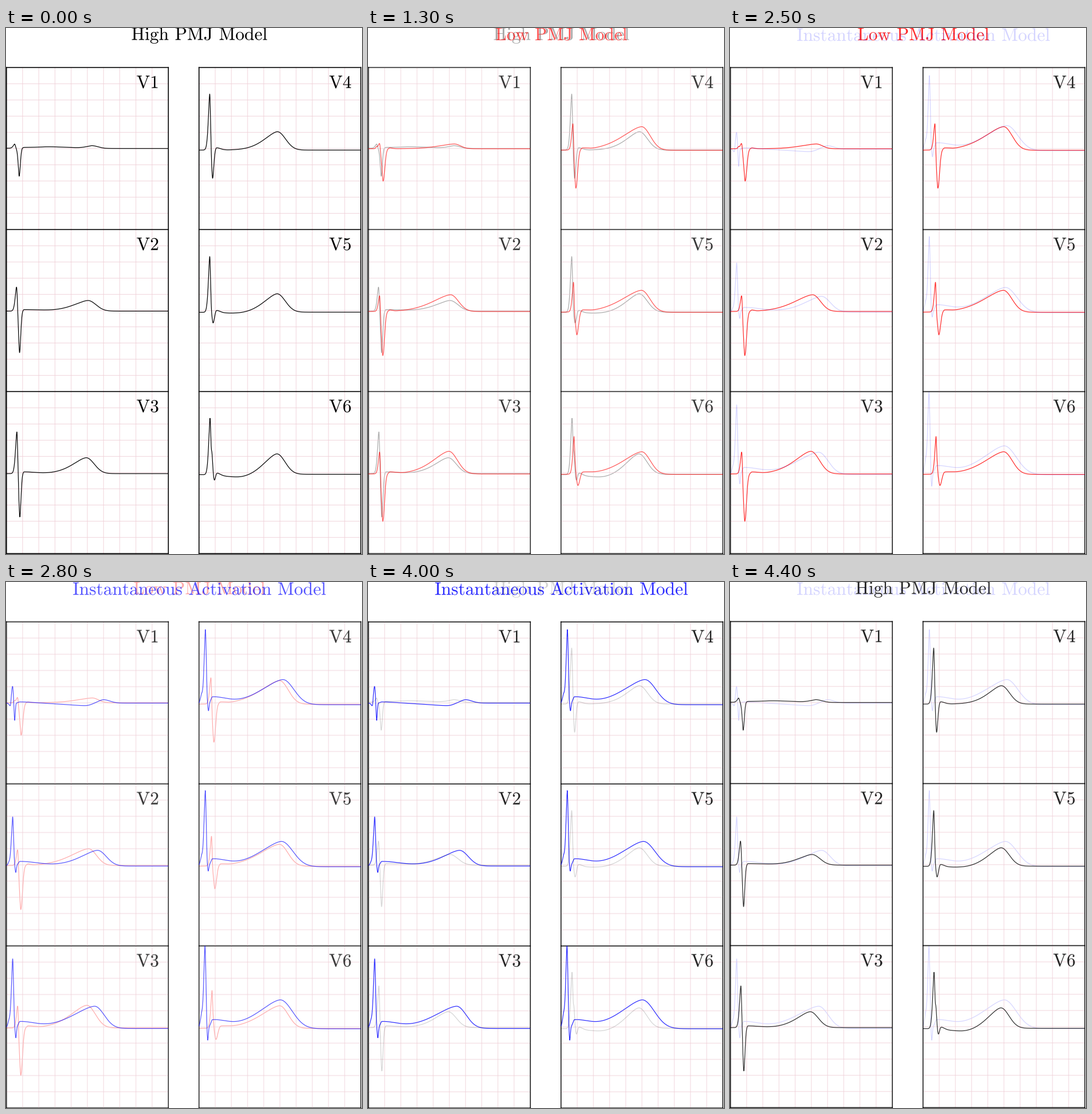
Animation of 616x909 px, one loop 4500 ms. Source, as a matplotlib script:

```python
import numpy as np
import matplotlib.pyplot as plt
from matplotlib.animation import FuncAnimation
from matplotlib.collections import LineCollection
from matplotlib.patches import PathPatch
from matplotlib.textpath import TextPath
from matplotlib.transforms import Affine2D

plt.rcParams["mathtext.fontset"] = "cm"

W, H, DPI = 616, 909, 64
PX = 72 / DPI              # one pixel in points
SIDE, CELL = 280, 28       # panel and grid size
COLS, TOP = (0.8, 334.0), 68.3
EM = 31.2                  # text size in pixels

fig = plt.figure(figsize=(W / DPI, H / DPI), dpi=DPI, facecolor="white")
ax = fig.add_axes([0, 0, 1, 1])
ax.set(xlim=(0, W), ylim=(H, 0))
ax.axis("off")


def wave(x, centre, height, rise, fall):
    """Lopsided bell: a pointed rise and a Gaussian fall."""
    u = x - centre
    return height * np.exp(-np.where(u < 0, np.abs(u / rise) ** 1.6, (u / fall) ** 2))


class Model:
    """One set of six leads whose artists fade together."""

    def __init__(self, title, color, shift, baseline, r, s, j):
        self.color, self.top, self.parts = color, TOP + shift, []
        self.r, self.s, self.j = r, s, j
        grid, frame = [], []
        y0, y1 = self.top, self.top + 3 * SIDE
        for x0 in COLS:
            x1 = x0 + SIDE
            grid += [[(x0, y0 + k * CELL), (x1, y0 + k * CELL)]
                     for k in range(30) if k % 10]
            grid += [[(x0 + k * CELL, y0), (x0 + k * CELL, y1)] for k in range(1, 10)]
            frame += [[(x0, y0 + k * SIDE), (x1, y0 + k * SIDE)] for k in range(4)]
            frame += [[(x, y0), (x, y1)] for x in (x0, x1)]
        self.lines(grid, "#f0d0d8", 0.9)
        self.lines(frame, "black", 1.6)
        for n in range(6):
            self.text(f"V{n + 1}", COLS[n // 3] + 225,
                      self.top + n % 3 * SIDE + 35.6, "black")
        self.text(title, 334.7, baseline, color, center=True)

    def lines(self, segs, color, width):
        c = LineCollection(segs, colors=color, linewidths=width * PX,
                           capstyle="projecting", snap=False)
        self.parts.append(ax.add_collection(c))

    def text(self, s, x, y, color, center=False):
        words = [r"\mathrm{%s}" % w for w in s.split()]
        path = TextPath((0, 0), "$" + r"\hspace{0.38}".join(words) + "$", size=EM)
        if center:
            box = path.get_extents()
            x -= (box.x0 + box.x1) / 2
        path = path.transformed(Affine2D().scale(1, -1).translate(x, y))
        self.parts.append(ax.add_patch(PathPatch(path, fc=color, lw=0)))

    def lead(self, n, base, r, s, j, t, *extra):
        """Add up the R, S, J and T waves of lead n above its rest level."""
        x = np.linspace(0, SIDE, 4 * SIDE + 1)
        centre, rise = self.j
        y = base + wave(x, *r, *self.r) + wave(x, *s, *self.s) + wave(x, *t)
        y += wave(x, centre, j[0], rise, j[1]) + sum(wave(x, *e) for e in extra)
        mid = self.top + (n - 1) % 3 * SIDE + SIDE / 2
        self.parts += ax.plot(COLS[(n - 1) // 3] + x, mid - np.minimum(y, SIDE / 2),
                              color=self.color, lw=1.2 * PX, snap=False,
                              solid_joinstyle="round", solid_capstyle="butt")

    def fade(self, alpha, order):
        for p in self.parts:
            p.set(visible=alpha > 0, alpha=alpha, zorder=order)


# r, s: (x, height); j: (height, fall); t and extras: (x, height, rise, fall)
high = Model("High PMJ Model", "black", 0, 20.8, r=(3.3, 2), s=(2.4, 2.9), j=(30, 2))
high.lead(1, 0, (14, 7), (21.9, -49), (0.5, 9), (148, 4.5, 14, 15), (72, 3, 50, 55))
high.lead(2, -1, (17.5, 44), (22.6, -72), (2.6, 45), (141, 18.4, 36, 19.5))
high.lead(3, -1.8, (18, 75), (23, -75), (3, 28), (138, 27.5, 34, 19.5))
high.lead(4, -2.7, (18.5, 99), (23.4, -49), (4, 10), (135.5, 31.8, 33, 20))
high.lead(5, -2.8, (18.5, 97), (24.3, -18), (4, 9), (135, 32, 33, 20),
          (70, -2.5, 40, 40))
high.lead(6, -3, (19, 97), (26.5, -9), (4.5, 9), (134.5, 36, 33, 20),
          (74, -6.3, 40, 40), (22.3, 34, 1.5, 2))

low = Model("Low PMJ Model", "red", 0, 21.3, r=(3.1, 1.5), s=(3.1, 4.2), j=(37, 3))
low.lead(1, -.4, (19.4, 12), (25.3, -56), (1.5, 6), (148.5, 8.3, 39, 15), (14, 3, 2, 1.5))
low.lead(2, -1.7, (19.5, 34), (24.7, -76.5), (2, 6), (142, 29, 46, 19.5))
low.lead(3, -2.4, (19.6, 46), (24.7, -82), (3, 15), (139, 39.2, 41, 21))
low.lead(4, -3, (20.7, 53), (25.6, -66.5), (2.5, 12), (139.5, 40.8, 49, 21))
low.lead(5, -3, (21.6, 54), (27.3, -40), (2.5, 14), (139, 38, 50, 21))
low.lead(6, -3.2, (22.4, 60), (29.2, -20), (3, 20), (139.5, 39.2, 48, 21),
         (24.5, 16, 2, 1.5))

instant = Model("Instantaneous Activation Model", "blue", 0.8, 22.3,
                r=(3.2, 2.2), s=(1.6, 1.5), j=(23, 4))
instant.lead(1, -.2, (10.6, 30), (14.1, -32), (2.2, 35), (167.5, 6, 14, 16),
             (137, -4.5, 48, 16), (7, -12, 2.5, 1.5))
instant.lead(2, -1.8, (10.7, 85), (16, -12), (8, 46), (157.5, 27.2, 43, 21.5),
             (4, 4, 3, 2))
instant.lead(3, -2.5, (10.7, 120), (16.2, -18), (11.3, 37), (152.5, 38.5, 56, 23.3),
             (4, 10, 3, 2.5))
instant.lead(4, -3, (11, 129), (16.3, -13), (12.5, 34), (145, 43.5, 55, 27),
             (4, 14, 3, 2.5))
instant.lead(5, -3, (10.8, 131), (15.8, -10), (12.5, 34), (142.5, 43.8, 54, 28.3),
             (4, 14, 3, 2.5))
instant.lead(6, -3, (10.3, 143), (15, -23), (14, 35), (140.5, 50, 55, 29.5),
             (4, 18, 3, 2.5))

MODELS = (high, low, instant)
HOLD, STEPS = 10, 5        # still frames, then cross-fade frames


def draw(i):
    turn, step = divmod(i, HOLD + STEPS)
    mix = max(0, step - HOLD + 1) / (STEPS + 1)
    for k, model in enumerate(MODELS):
        gap = (k - turn) % 3
        model.fade((1 - mix, mix, 0)[gap], 1 + gap)
    return []


draw(0)
anim = FuncAnimation(fig, draw, frames=3 * (HOLD + STEPS), interval=100,
                     repeat=True, repeat_delay=0, blit=False)
plt.show()
```
